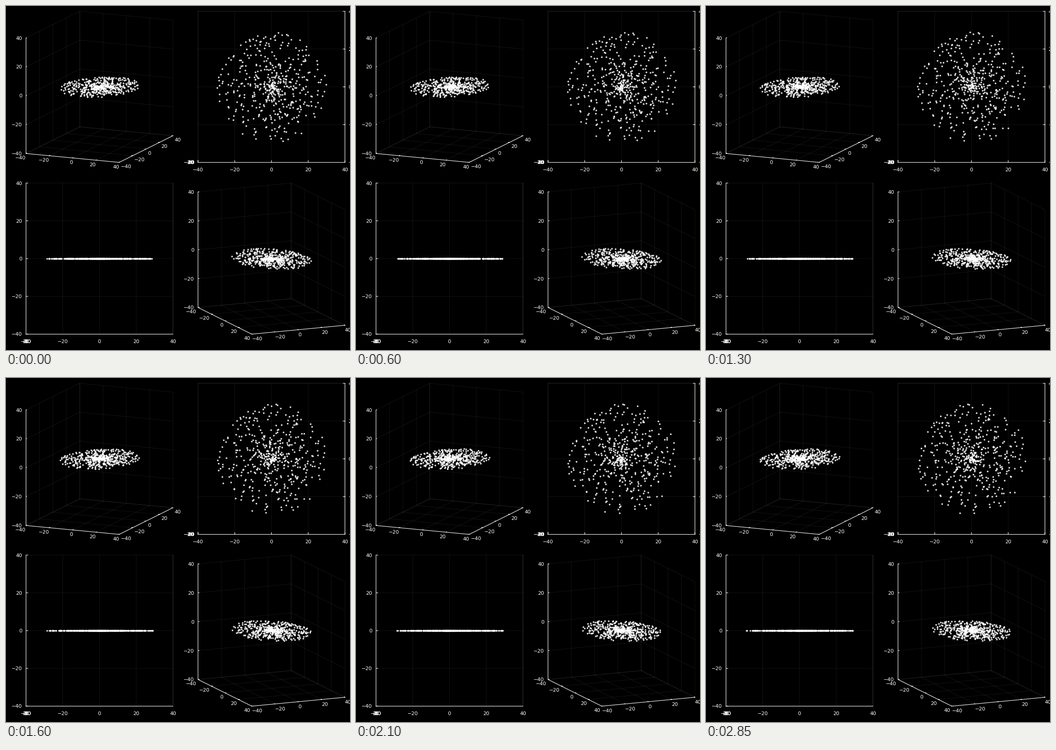
These frames come from a looping animation (748x749 px, 2.9 s). A matplotlib script:

```python
import numpy as np
import matplotlib.pyplot as plt
from matplotlib.animation import FuncAnimation

W, H, DPI = 748, 749, 64
PX = 72 / DPI                      # points per pixel
FRAMES, STEP = 58, 50
BOX = np.array([319.5, 329])       # every view is fitted to this size
LO, HI = -40, 40
TICKS = range(LO, HI + 1, 20)
STARS, RIM, RIM_SPEED = 473, 29.7, 0.006

plt.rcParams["font.family"] = "DejaVu Sans"
fig = plt.figure(figsize=(W / DPI, H / DPI), dpi=DPI, facecolor="black")
ax = fig.add_axes([0, 0, 1, 1])
ax.set_xlim(0, W)
ax.set_ylim(H, 0)
ax.axis("off")


class Panel:
    """View of the cube [LO, HI]^3 stretched to fill a box on the page."""

    def __init__(self, left, top, azim, elev, xlab, ylab):
        az, el = np.radians([azim, elev])
        c, s = np.cos(az), np.sin(az)
        right = np.array([c, s, 0])
        down = np.array([s * s * np.sin(el), -c * c * np.sin(el), -np.cos(el)])
        edges = np.column_stack([right / right.sum(), down / abs(down).sum()])
        edges *= BOX
        self.origin = np.array([left, top + BOX[1] - edges[0, 1]])
        self.scale = edges / (HI - LO)
        self.draw_grid()
        self.draw_axes(xlab, ylab)
        self.dots = ax.scatter([], [], s=(3.7 * PX) ** 2, c="white",
                               alpha=0.84, linewidths=0, zorder=3)

    def project(self, pts):
        return self.origin + (np.asarray(pts, float) - LO) @ self.scale

    def lines(self, segments, **style):
        xy = []
        for a, b in segments:
            xy += [*self.project([a, b]), (np.nan, np.nan)]
        ax.plot(*np.transpose(xy), color="white", snap=False, **style)

    def draw_grid(self):
        # Each tick draws an L over the two planes it belongs to
        families = (
            lambda v: ((v, LO, LO), (v, HI, LO), (v, HI, HI)),
            lambda v: ((HI, v, LO), (LO, v, LO), (LO, v, HI)),
            lambda v: ((LO, LO, v), (LO, HI, v), (HI, HI, v)),
        )
        for family in families:
            bends = [family(v) for v in TICKS]
            self.lines([pair for a, b, c in bends for pair in ((a, b), (b, c))],
                       lw=PX, alpha=0.08, zorder=1)

    def draw_axes(self, xlab, ylab):
        axes = (
            (lambda v: (v, LO, LO), (0, 1, 0), xlab),
            (lambda v: (HI, v, LO), (-1, 0, 0), ylab),
            (lambda v: (LO, LO, v), (0, 1, 0), (-8, 0, "right")),
        )
        for at, tick, (dx, dy, ha) in axes:
            self.lines([(at(LO), at(HI))]
                       + [(at(v), np.add(at(v), tick)) for v in TICKS],
                       lw=1.1 * PX, zorder=2)
            for v in TICKS:
                x, y = self.project(at(v))
                ax.text(x + dx, y + dy + 1, str(v).replace("-", "\u2212"),
                        color="white", fontsize=11 * PX, ha=ha, va="center",
                        zorder=4)


below = (0, 15, "center")
panels = [
    Panel(43.5, 11.5, 30, 17.1, (0, 9, "right"), (3.5, 8.5, "left")),
    Panel(417.5, 11.5, 0, 90, below, (7.5, 0, "left")),
    Panel(43.5, 385.5, 90, 0, below, below),
    Panel(417.5, 385.5, 60, 17.1, (-3.5, 8.5, "right"), (0, 10, "left")),
]

# Evenly spread radii, random phases, Keplerian speeds
rng = np.random.default_rng(12)
radius = np.linspace(0.4, RIM, STARS)
phase = rng.uniform(0, 2 * np.pi, STARS)
omega = RIM_SPEED * (RIM / radius) ** 1.5


def update(i):
    a = phase + omega * i
    stars = np.column_stack([radius * np.cos(a), radius * np.sin(a), 0 * a])
    for p in panels:
        p.dots.set_offsets(p.project(stars))
    return [p.dots for p in panels]


anim = FuncAnimation(fig, update, frames=FRAMES, interval=STEP,
                     repeat=True, repeat_delay=0)
plt.show()
```
